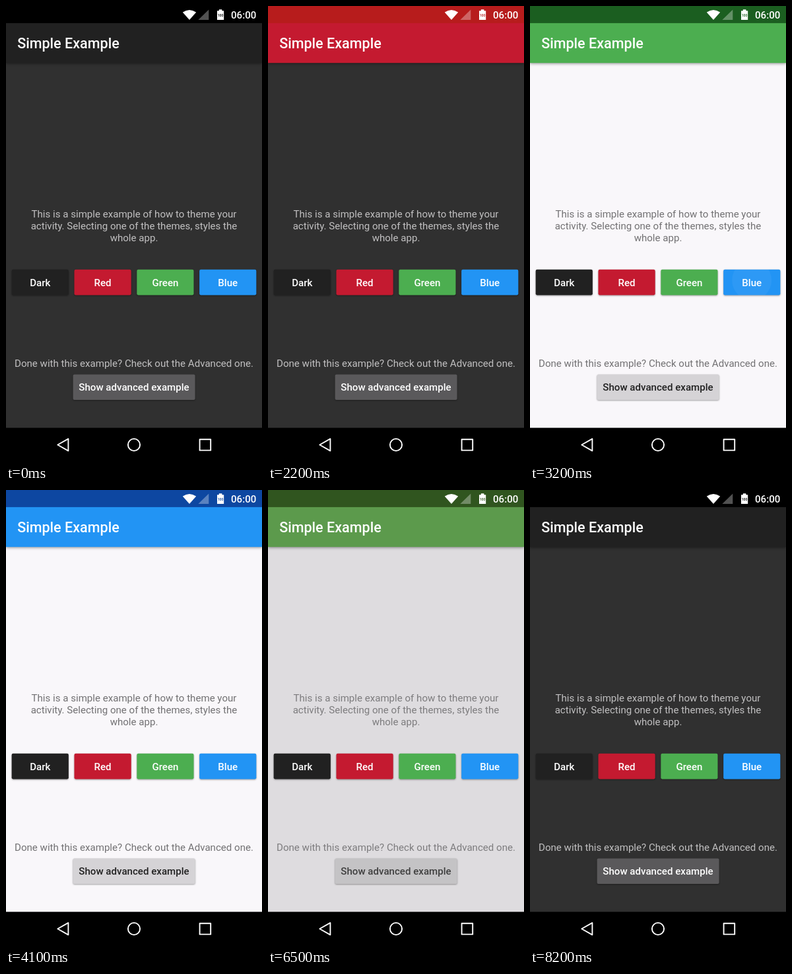
An HTML page that plays this animation: 388 by 690 pixels, repeating every 8.3 s.

```html
<!DOCTYPE html>
<html lang="en">
<head>
<meta charset="utf-8">
<title>Simple Example</title>
<style>
html, body { margin: 0; width: 100%; height: 100%; overflow: hidden; background: #000; }
svg { display: block; width: 388px; height: 690px; font: 400 15.09px Roboto, sans-serif; }
.medium { font-weight: 500; }
.mid { text-anchor: middle; }
.bar { filter: drop-shadow(0 1.5px 2.2px rgba(0, 0, 0, .42)); }
.btn { filter: drop-shadow(0 1.3px 1.1px rgba(0, 0, 0, .36)); }
</style>
</head>
<body>
<svg viewBox="0 0 388 690">
  <rect id="page" width="388" height="639"/>
  <rect id="bar" class="bar" y="25" width="388" height="61.2"/>
  <rect id="status" width="388" height="25.9"/>

  <g fill="#fff">
    <path d="M267.8 9.6Q278 2.6 288.2 9.6L278 21Z"/>
    <path d="M307.3 5.4V21H291.4Z" opacity=".32"/>
    <path d="M320 7.2h2.8V5.2h4.6v2h2.8V21H320Z"/>
    <text class="medium" x="341" y="19">06:00</text>
    <text class="medium" x="17.2" y="64.4" font-size="21.56">Simple Example</text>
  </g>
  <text id="charge" class="medium mid" x="325.1" y="15.8" font-size="5.2">100</text>

  <g id="copy" class="mid">
    <text x="194" y="320.3">This is a simple example of how to theme your</text>
    <text x="194" y="338">activity. Selecting one of the themes, styles the</text>
    <text x="194" y="355.6">whole app.</text>
    <text x="194" y="546.3">Done with this example? Check out the Advanced one.</text>
  </g>

  <g id="buttons" class="medium mid"></g>
  <rect id="more" class="btn" x="101.6" y="557.4" width="185" height="38.6" rx="2.1"/>
  <text id="moreText" class="medium mid" x="194" y="582.3">Show advanced example</text>

  <rect y="638.3" width="388" height="52"/>
  <g fill="none" stroke="#fff" stroke-width="1.9" stroke-linejoin="round">
    <path d="M78.3 664L94.4 654.9V673.1Z"/>
    <circle cx="194" cy="664" r="9.1"/>
    <rect x="293.6" y="655.8" width="16.6" height="16.6"/>
  </g>
</svg>
<script>
const LOOP = 8300, FADE = 230, LEAD = 30, PRESS = 300;
const $ = id => document.getElementById(id);

const dark = { page: '#303030', copy: '#c1c0c1', more: '#5a595b', moreText: '#ffffff' };
const light = { page: '#f9f7fa', copy: '#727173', more: '#d5d3d6', moreText: '#212121' };
const themes = [
  { ...dark, bar: '#212121', status: '#000000' },
  { ...dark, bar: '#c41a30', status: '#b71c1c' },
  { ...light, bar: '#4cae50', status: '#1b5e20' },
  { ...light, bar: '#2294f4', status: '#0d47a1' }
];
for (const theme of themes) theme.charge = theme.status;

// [time, theme] of every selection
const picks = [[1300, 1], [2500, 2], [3400, 3], [5800, 2], [6500, 1], [7600, 0]];

$('buttons').innerHTML = ['Dark', 'Red', 'Green', 'Blue'].map((label, i) => {
  const x = 8.65 + 94.84 * i;
  const box = `x="${x}" y="398.8" width="86.2" height="38.6" rx="2.1"`;
  return `<clipPath id="clip${i}"><rect ${box}/></clipPath>
    <rect class="btn" ${box} fill="${themes[i].bar}"/>
    <g clip-path="url(#clip${i})"><circle id="ripple${i}" cx="${x + 43}" cy="415" r="0" fill="#fff" opacity=".05"/></g>
    <text x="${x + 43.1}" y="423.8" fill="#fff">${label}</text>`;
}).join('');

const clamp = v => Math.max(0, Math.min(1, v));
const channels = hex => [1, 3, 5].map(i => parseInt(hex.slice(i, i + 2), 16));

function mix(a, b, k) {
  const to = channels(b);
  return `rgb(${channels(a).map((v, i) => Math.round(v + (to[i] - v) * k))})`;
}

function draw(t) {
  let from = 0, to = 0, k = 1;
  const radii = [0, 0, 0, 0];
  for (const [time, pick] of picks) {
    const start = time - LEAD;
    if (t >= start) {
      from = to;
      to = pick;
      k = clamp((t - start) / FADE);
    } else if (t > time - PRESS) {
      radii[pick] = 30 * clamp((t - time + PRESS) / 100);
    }
  }
  for (const id in themes[0]) $(id).setAttribute('fill', mix(themes[from][id], themes[to][id], k));
  radii.forEach((r, i) => $('ripple' + i).setAttribute('r', r));
}

const begin = performance.now();
function tick() {
  draw((performance.now() - begin) % LOOP);
  requestAnimationFrame(tick);
}
draw(0);
requestAnimationFrame(tick);
</script>
</body>
</html>
```
